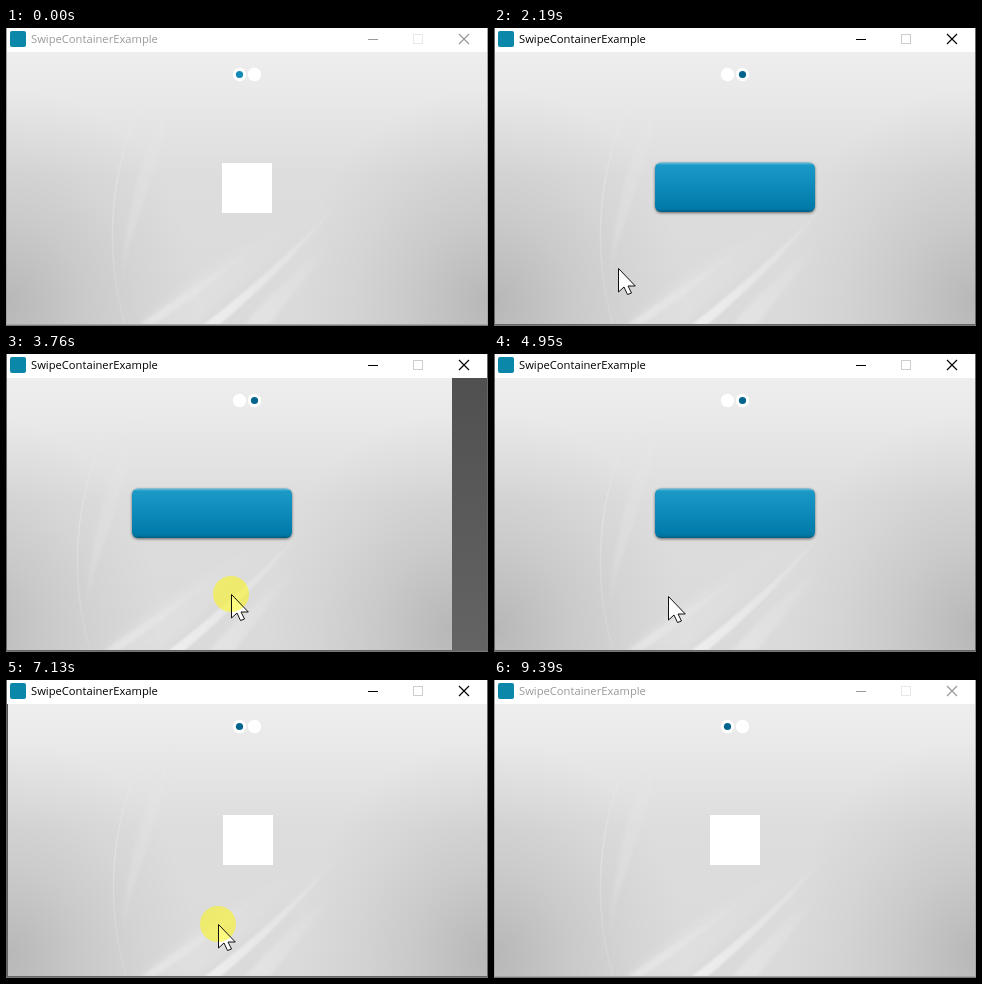
An HTML page with a canvas that plays this animation: 482x298 px, repeating every 9540 ms.

```html
<!DOCTYPE html>
<html lang="en">
<head>
<meta charset="utf-8">
<title>Swipe container</title>
<style>
html, body { margin: 0; width: 100%; height: 100%; overflow: hidden; background: #fff; }
canvas { display: block; }
</style>
</head>
<body>
<canvas id="stage" width="482" height="298"></canvas>
<script>
const LOOP = 9540, STEP = 46.4, SETTLE = 280;
const PAGE_W = 480, PAGE_H = 272, TOP = 24, OVERSCROLL = 50;
const FOCUS = 1420, BLUR = 9390;
const ctx = document.getElementById('stage').getContext('2d');

// Pointer moves: start, end, x, y
const moves = [
  [860, 1260, 244, 240], [1540, 1880, 124, 240], [2330, 3180, 265, 239],
  [3546, 4150, 174, 242], [5430, 5796, 272, 243], [6000, 6750, 209, 244],
  [7117, 7630, 307, 244], [8340, 8680, 300, 300]
];
// Swipes: press, release
const swipes = [[1418, 1880], [3412, 4669], [5268, 5796], [6938, 8056]];

const clamp = (v, lo, hi) => Math.min(hi, Math.max(lo, v));

function pointerAt(t) {
  let x = 249, y = 300;
  for (const [from, to, toX, toY] of moves) {
    const p = 1 - (1 - clamp((t - from) / (to - from), 0, 1)) ** 1.5;
    x += (toX - x) * p;
    y += (toY - y) * p;
  }
  return { x, y };
}

// The page follows the pointer, then glides to the neighbour or back
function scrollAt(t) {
  let page = 0, x = 0, pressed = false;
  for (const [press, release] of swipes) {
    if (t < press) break;
    const d = pointerAt(Math.min(t, release)).x - pointerAt(press).x;
    const pull = d * Math.abs(d) / (Math.abs(d) + 6);
    x = clamp(x + pull, -PAGE_W - OVERSCROLL, OVERSCROLL);
    pressed = t < release;
    if (pressed) break;
    const next = clamp(page - Math.sign(d), 0, 1);
    const p = Math.min(1, (t - release) / SETTLE);
    x += (-next * PAGE_W - x) * p;
    if (p === 1) page = next;
  }
  return { x: Math.round(x), page, pressed };
}

function ramp(c, x0, y0, x1, y1, ...stops) {
  const g = c.createLinearGradient(x0, y0, x1, y1);
  stops.forEach(([p, color]) => g.addColorStop(p, color));
  return g;
}

function rect(color, x, y, w, h) {
  ctx.fillStyle = color;
  ctx.fillRect(x, y, w, h);
}

function disc(color, x, y, r) {
  ctx.fillStyle = color;
  ctx.beginPath();
  ctx.arc(x, y, r, 0, 7);
  ctx.fill();
}

function makeBackdrop() {
  const canvas = document.createElement('canvas');
  canvas.width = PAGE_W;
  canvas.height = PAGE_H;
  const c = canvas.getContext('2d');
  c.fillStyle = ramp(c, 0, 0, 0, PAGE_H, [0, '#eeeeee'], [.15, '#e9e9e9'], [.45, '#dddddd'], [1, '#dadada']);
  c.fillRect(0, 0, PAGE_W, PAGE_H);

  // Shaded lower corners
  for (const x of [0, PAGE_W]) {
    c.save();
    c.translate(x, 250);
    c.scale(190, 215);
    const g = c.createRadialGradient(0, 0, 0, 0, 0, 1);
    g.addColorStop(0, 'rgba(0,0,0,.16)');
    g.addColorStop(.4, 'rgba(0,0,0,.08)');
    g.addColorStop(.7, 'rgba(0,0,0,.03)');
    g.addColorStop(1, 'rgba(0,0,0,0)');
    c.fillStyle = g;
    c.fillRect(-1, -1.2, 2, 2.4);
    c.restore();
  }

  const streak = (path, alpha, x0, y0, x1, y1, blur) => {
    c.filter = `blur(${blur}px)`;
    c.fillStyle = ramp(c, x0, y0, x1, y1, [0, `rgba(255,255,255,${alpha})`], [1, 'rgba(255,255,255,0)']);
    c.fill(new Path2D(path));
  };
  streak('M130 274 Q210 200 330 140 Q280 190 190 274Z', .2, 130, 272, 300, 150, 4);
  streak('M196 273 Q278 210 342 138 Q285 212 212 273Z', .55, 196, 272, 342, 138, .8);
  streak('M237 273 Q280 222 345 172 Q300 222 262 273Z', .28, 237, 272, 330, 180, 2);
  streak('M132 273 Q190 232 262 184 Q200 238 146 273Z', .28, 132, 272, 262, 184, 1.5);
  streak('M115 230 Q120 115 172 26 Q150 120 121 195Z', .22, 115, 230, 165, 30, 2);

  c.filter = 'blur(.7px)';
  c.lineWidth = 1.5;
  c.strokeStyle = ramp(c, 0, 40, 0, PAGE_H,
    [0, 'rgba(255,255,255,0)'], [.45, 'rgba(255,255,255,.25)'], [1, 'rgba(255,255,255,.1)']);
  c.stroke(new Path2D('M135 50 C102 120 97 200 118 272'));
  return canvas;
}
const backdrop = makeBackdrop();

function drawButton(x, y) {
  ctx.save();
  ctx.beginPath();
  ctx.roundRect(x, y - .5, 160, 49.5, 6);
  ctx.shadowColor = 'rgba(0,0,0,.55)';
  ctx.shadowBlur = 3;
  ctx.shadowOffsetY = 1;
  ctx.fillStyle = ramp(ctx, 0, y, 0, y + 49,
    [0, '#5bb8d8'], [.05, '#1a98c6'], [.5, '#0d8aba'], [.94, '#0079a7'], [1, '#005c82']);
  ctx.fill();
  ctx.restore();
}

function drawPages(x) {
  rect(ramp(ctx, 0, TOP, 0, 296, [0, '#505050'], [1, '#646464']), 0, TOP, 482, PAGE_H);
  ctx.drawImage(backdrop, 1 + x, TOP);
  ctx.drawImage(backdrop, 1 + x + PAGE_W, TOP);
  rect('#fff', 216 + x, 135, 50, 50);
  drawButton(161 + x + PAGE_W, 135);
}

function drawDots(page, color) {
  for (const i of [0, 1]) disc('#fff', 233.5 + 15 * i, 46.5, 6.7);
  disc(color, 233.5 + 15 * page, 46.5, 3.6);
}

function drawWindow(active) {
  const ink = active ? '#000' : '#999', edge = active ? '#666' : '#a8a4a4';
  rect('#fff', 0, 0, 482, TOP);
  ctx.fillStyle = '#0b87a9';
  ctx.beginPath();
  ctx.roundRect(4, 3, 16, 16, 2);
  ctx.fill();

  ctx.font = '11.2px "Open Sans", "Noto Sans", sans-serif';
  ctx.fillStyle = ink;
  ctx.fillText('SwipeContainerExample', 25, 15);

  ctx.lineWidth = 1;
  ctx.strokeStyle = active ? '#ccc' : '#e8e8e8';
  ctx.strokeRect(407.5, 6.5, 9, 9);
  ctx.strokeStyle = ink;
  ctx.stroke(new Path2D('M362 11.5H372'));
  ctx.lineWidth = 1.2;
  ctx.stroke(new Path2D('M453 6L463 16 M463 6L453 16'));

  rect(edge, 0, 0, 1, 297);
  rect(edge, 481, 0, 1, 297);
  rect(edge, 0, 296, 482, 1);
  rect('#777', 0, 297, 482, 1);
}

const arrow = new Path2D('M.5 .5V24L6 19L9.5 26.5L13.5 25L10 18H17.3Z');

function drawPointer({ x, y }, pressed) {
  ctx.save();
  ctx.translate(Math.round(x), Math.round(y));
  ctx.fillStyle = '#fff';
  ctx.fill(arrow);
  if (pressed) disc('rgba(255,250,0,.5)', 0, 0, 18);
  ctx.strokeStyle = '#111';
  ctx.lineWidth = 1;
  ctx.stroke(arrow);
  ctx.restore();
}

function draw(time) {
  // The picture advances in coarse, even steps
  const t = 28 + Math.floor((time - 22) / STEP) * STEP;
  const { x, page, pressed } = scrollAt(t);
  drawPages(x);
  drawDots(page, time < FOCUS ? '#128ab5' : '#00648c');
  drawWindow(time >= FOCUS && time < BLUR);
  drawPointer(pointerAt(t), pressed);
}

let start;
function tick(now) {
  start ??= now;
  draw((now - start) % LOOP);
  requestAnimationFrame(tick);
}
draw(0);
requestAnimationFrame(tick);
</script>
</body>
</html>
```
